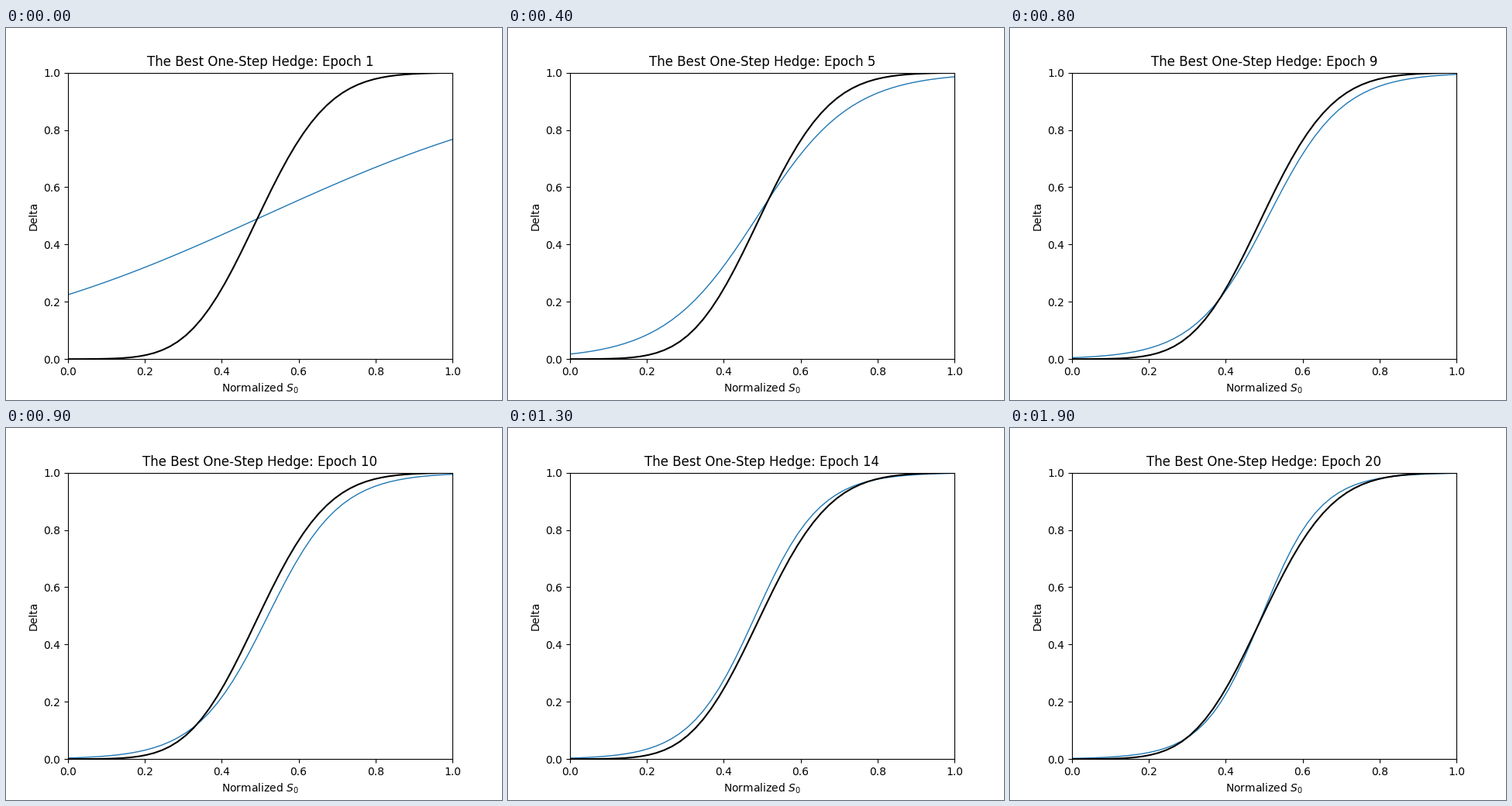
A matplotlib script for the animation above (2 s loop, 640x480 px).

```python
import math

import matplotlib.pyplot as plt
import numpy as np
from matplotlib.animation import FuncAnimation

EPOCHS = 20
INTERVAL = 100
VOL = 0.0569          # volatility over the single step
SPAN = 0.4            # normalized 0..1 covers spot 0.8..1.2

# Learned sigmoid: steepness and midpoint at some epochs
KNOTS = [1, 5, 7, 10, 14, 17, 20]
SLOPES = [2.43, 8.25, 9.62, 10.75, 11.8, 12.4, 13.1]
CENTERS = [0.5095, 0.4885, 0.494, 0.52, 0.482, 0.504, 0.494]


def exact_delta(x):
    """Black-Scholes call delta at the money around x = 0.5."""
    spot = 1 + SPAN * (x - 0.5)
    d1 = np.log(spot) / VOL + VOL / 2
    return np.array([0.5 * (1 + math.erf(d / math.sqrt(2))) for d in d1])


def learned_delta(x, epoch):
    slope = np.interp(math.log(epoch), np.log(KNOTS), SLOPES)
    center = np.interp(epoch, KNOTS, CENTERS)
    bend = np.interp(epoch, [17, 20], [0, 4])
    u = x - center
    return 1 / (1 + np.exp(bend * u**3 - slope * u))


x = np.linspace(0, 1, 50)

fig, ax = plt.subplots(figsize=(6.4, 4.8), dpi=100)
learned, = ax.plot(x, learned_delta(x, 1), color="tab:blue", lw=1)
ax.plot(x, exact_delta(x), color="black", lw=1.5)
ax.set_xlim(0, 1)
ax.set_ylim(0, 1)
ax.set_xlabel("Normalized $S_0$")
ax.set_ylabel("Delta")
title = ax.set_title("The Best One-Step Hedge: Epoch 1")


def update(frame):
    epoch = frame + 1
    learned.set_ydata(learned_delta(x, epoch))
    title.set_text(f"The Best One-Step Hedge: Epoch {epoch}")
    return learned, title


def init():
    return update(0)


anim = FuncAnimation(fig, update, frames=EPOCHS, init_func=init,
                     interval=INTERVAL, repeat=True, repeat_delay=0, blit=False)

plt.show()
```
